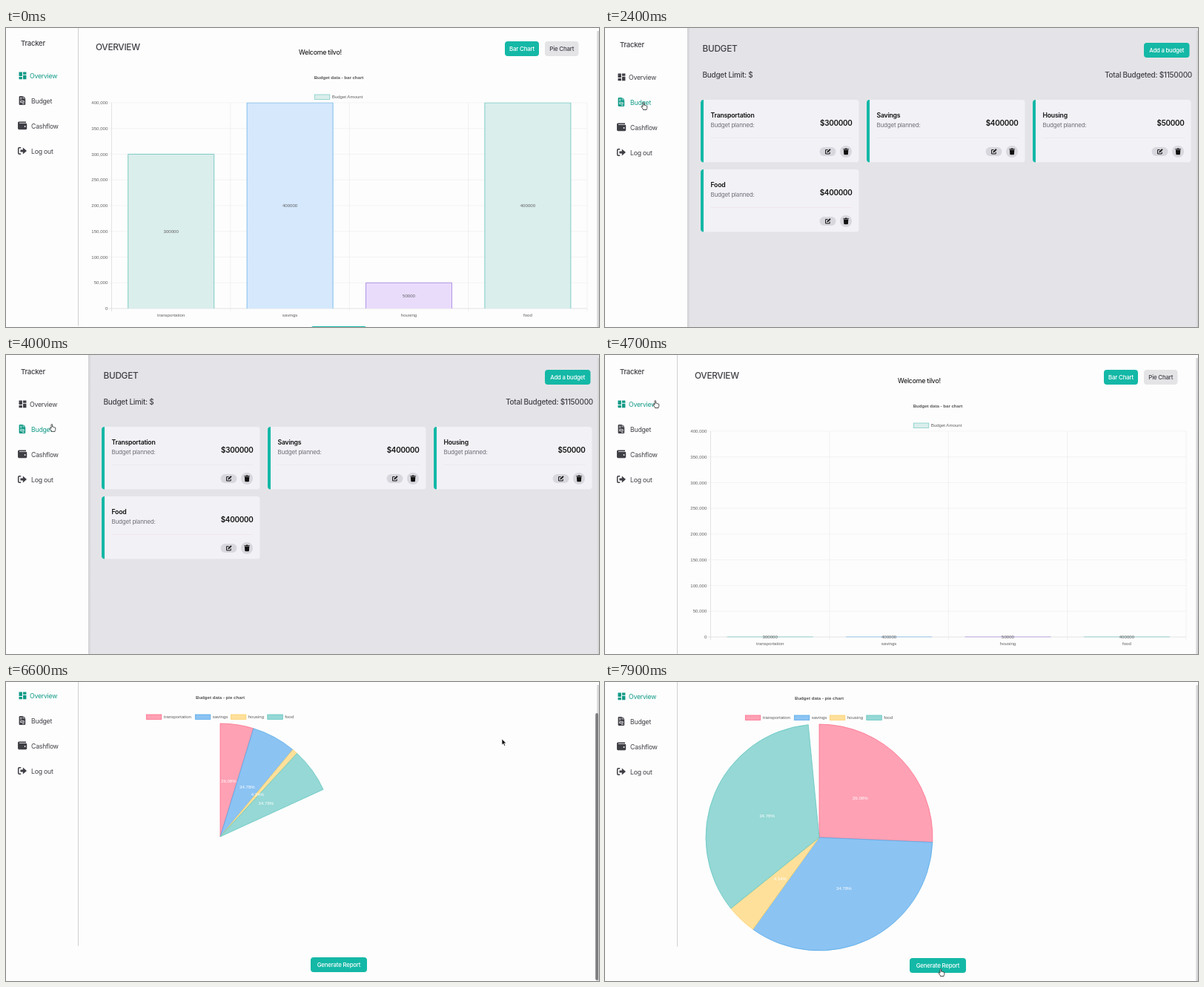
Recreate the animation shown at these times as an HTML page. Size 800 by 404 pixels, loop 8000 ms.

```html
<!DOCTYPE html>
<html lang="en">
<head>
<meta charset="utf-8">
<title>Budget tracker</title>
<style>
  html, body { margin: 0; width: 100%; height: 100%; overflow: hidden; background: #fdfdfd; }
  svg { display: block; width: 100vw; height: 100vh; }
  .ui { font-family: Inter, Roboto, sans-serif; letter-spacing: -.025em; }
  .chart { font-family: "Liberation Sans", Arial, sans-serif; }
</style>
</head>
<body>
<svg id="stage" viewBox="0 0 800 404"></svg>
<script>
const LOOP = 8000, BOUNCE = 3741;
const BARS_START = 4742, PIE_START = 6533;
const BUDGET_IN = 2200, BUDGET_OUT = 4700, PIE_IN = 6350;
const TEAL = '#14b8a6', INK = '#3f3f46', ACTIVE = '#109a86';
const BASE = 382, STEP = 34.75, LEFT = 142.5, COL = 160.4, HALF_BAR = 58;

const data = [
  { name: 'transportation', value: 300000, bar: ['#daeeec', '#74c8bf'], pie: ['#fea1b4', '#ff6384'], share: '26.08%', key: 189 },
  { name: 'savings', value: 400000, bar: ['#d5e8fc', '#78b8ea'], pie: ['#8bc3f3', '#4ba5e6'], share: '34.78%', key: 255 },
  { name: 'housing', value: 50000, bar: ['#e9dcfb', '#a98ce2'], pie: ['#fee09b', '#fbce62'], share: '4.34%', key: 303 },
  { name: 'food', value: 400000, bar: ['#daeeec', '#74c8bf'], pie: ['#95d8d5', '#58c2bd'], share: '34.78%', key: 352.5 }
];
const total = data.reduce((sum, d) => sum + d.value, 0);

// Text is placed by the vertical middle of its capitals.
const text = (x, mid, str, size, o = {}) =>
  `<text class="${o.cls || 'ui'}" x="${x}" y="${mid + size * .36}" font-size="${size}" fill="${o.fill || INK}"
    font-weight="${o.weight || 400}" text-anchor="${o.anchor || 'start'}">${str}</text>`;
const label = (x, mid, str, o = {}) => text(x, mid, str, 6.1, { cls: 'chart', fill: '#5f5f5f', ...o });
const rect = (x, y, w, h, fill, rx = 0, more = '') =>
  `<rect x="${x}" y="${y}" width="${w}" height="${h}" fill="${fill}" rx="${rx}" ${more}/>`;
const line = (x1, y1, x2, y2, color, w = .6) =>
  `<path d="M${x1} ${y1}L${x2} ${y2}" stroke="${color}" stroke-width="${w}"/>`;
const group = (id, body) => `<g id="${id}">${body}</g>`;
const button = (x, y, w, str, size, fill = TEAL, ink = '#fff') =>
  rect(x, y, w, 20, fill, 4) + text(x + w / 2, y + 10, str, size, { fill: ink, weight: 500, anchor: 'middle' });

const icons = {
  Overview: '<path d="M17.5 62.5h4.4v5.4h-4.4zM17.5 69h4.4v3.2h-4.4zM23 62.5h4.4v3.2H23zM23 66.8h4.4v5.4H23z"/>',
  Budget: `<path d="M18.8 95h4v3.3h3.4v7.5q0 1.2-1.2 1.2h-6.2q-1.2 0-1.2-1.2v-9.6q0-1.2 1.2-1.2zM23.4 95l2.8 2.8h-2.8z"/>
    <path d="M19 97.2h2.4M19 99h2.4M19.6 101.6h4.6v2h-4.6zM22 105.4h2.6" stroke="#fff" stroke-width=".8" fill="none"/>`,
  Cashflow: `<path d="M17.6 129.5h9.4v1.4H18v.8h8.8q1.4 0 1.4 1.3v5.8q0 1.4-1.4 1.4h-9.2q-1.6 0-1.6-1.6v-7.5q0-1.6 1.6-1.6z"/>
    <circle cx="25.6" cy="136" r=".9" fill="#fff"/>`,
  'Log out': `<path d="M20.2 164.8h-2.3q-1.2 0-1.2 1.2v6q0 1.2 1.2 1.2h2.3" fill="none" stroke="currentColor" stroke-width="1.5"/>
    <path d="M19.4 167.4h3.4v-2.9l5.2 4.5-5.2 4.5v-2.9h-3.4z"/>`
};

function nav() {
  return text(20, 24, 'Tracker', 9.5, { weight: 500 }) + Object.keys(icons).map((name, i) =>
    `<g class="item" data-name="${name}" fill="currentColor">${icons[name]}
      ${text(i ? 34 : 32, 68 + 34 * i, name, 8.7, { fill: 'currentColor' })}</g>`).join('');
}

const chartTitle = (x, kind) =>
  label(x, 69.5, `Budget data - ${kind} chart`, { weight: 700, anchor: 'middle', fill: '#555' });
const swatch = (x, [fill, stroke], str) =>
  rect(x + .3, 93, 20.5, 6.4, fill, 0, `stroke="${stroke}" stroke-width=".7"`) + label(x + 23.7, 96.2, str);

function barChart() {
  let out = chartTitle(449, 'bar') + swatch(416, data[0].bar, 'Budget Amount');
  for (let i = 0; i <= 8; i++) {
    const y = BASE - i * STEP;
    out += line(LEFT - 4, y, 784, y, i ? '#ececed' : '#d2d2d4');
    out += label(137.3, y, (i * 50000).toLocaleString('en-US'), { anchor: 'end' });
  }
  for (let i = 0; i <= 4; i++) {
    const x = LEFT + i * COL;
    out += line(x, 104, x, BASE + 4, i ? '#e8e8ea' : '#d2d2d4');
  }
  out += '<clipPath id="area"><rect x="142" y="103.5" width="643" height="279"/></clipPath><g clip-path="url(#area)">';
  out += data.map(d => `<path class="bar" fill="${d.bar[0]}" stroke="${d.bar[1]}" stroke-width=".9"/>`).join('') + '</g>';
  data.forEach((d, i) => {
    const x = LEFT + COL * (i + .5);
    out += `<g class="amount">${label(x, 0, d.value, { anchor: 'middle' })}</g>`;
    out += label(x, 391.3, d.name, { anchor: 'middle' });
  });
  return out + button(411, 406, 76, 'Generate Report', 7.85);
}

function pieChart() {
  return chartTitle(289, 'pie') +
    data.map(d => swatch(d.key, d.pie, d.name)).join('') +
    data.map(d => `<path class="slice" fill="${d.pie[0]}" stroke="${d.pie[1]}" stroke-width=".7"/>`).join('') +
    data.map(d => `<g class="share">${label(0, 0, d.share, { anchor: 'middle', fill: '#fff' })}</g>`).join('') +
    button(411, 421, 76, 'Generate Report', 7.85);
}

function card(d, i) {
  const x = 129 + 224 * (i % 3), y = 98 + 94 * Math.floor(i / 3);
  const name = d.name[0].toUpperCase() + d.name.slice(1);
  return `<g transform="translate(${x} ${y})">` +
    rect(0, 0, 213.5, 84.5, '#f2f1f6', 4) +
    `<path d="M4 0v84.5q-4 0-4-4V4q0-4 4-4z" fill="${TEAL}"/>` +
    text(13.5, 21, name, 8.7, { weight: 600, fill: '#111' }) +
    text(13.5, 34.5, 'Budget planned:', 8, { fill: '#6f6f78' }) +
    text(204.5, 31, '$' + d.value, 9.9, { weight: 600, fill: '#111', anchor: 'end' }) +
    line(13.5, 51.5, 204.5, 51.5, i === 3 ? '#f0dfe5' : '#e7e6ec') +
    rect(160.5, 64, 22, 12, '#d8d7dd', 6) +
    '<circle cx="196" cy="70" r="8" fill="#d8d7dd"/>' +
    `<path d="M171.6 67.6h-3v5.4h5.6v-2.4" fill="none" stroke="#111" stroke-width="1"/>
     <path d="M170.4 71.4l.3-1.6 3.6-3.6 1.3 1.3-3.6 3.6z" fill="#111"/>
     <path d="M192.4 66.2h2.2l.6-.8h1.8l.6.8h2.2v1.1h-7.4zM192.9 67.8h6.4l-.4 5.6q0 .8-.9.8h-3.8q-.9 0-.9-.8z" fill="#111"/></g>`;
}

function budgetPage() {
  return rect(111, -5, 689, 420, '#e4e4e8') + rect(111, -5, 4, 420, 'url(#shade)') +
    text(131.5, 29, 'BUDGET', 11.8, { weight: 500 }) +
    button(727, 21, 61.5, 'Add a budget', 7.7) +
    text(131.5, 64, 'Budget Limit: $', 9.95, { weight: 500 }) +
    text(792, 64, 'Total Budgeted: $1150000', 9.95, { weight: 500, anchor: 'end' }) +
    data.map(card).join('');
}

const header = text(121, 29, 'OVERVIEW', 11.8, { weight: 500 }) +
  text(395, 36, 'Welcome tilvo!', 8.8, { fill: '#000' }) +
  button(673, 21, 46, 'Bar Chart', 7.9) +
  button(727, 21, 45.5, 'Pie Chart', 7.9, '#e4e4e7', INK);

const stage = document.getElementById('stage');
stage.innerHTML = `<defs>
  <linearGradient id="shade"><stop stop-color="#cfcfd3"/><stop offset="1" stop-color="#e4e4e8"/></linearGradient>
  <linearGradient id="edge"><stop stop-color="#e6e6e8"/><stop offset="1" stop-color="#cdcdd0"/></linearGradient></defs>` +
  rect(0, 0, 800, 404, '#fdfdfd') +
  group('page',
    group('overview', line(97.5, -5, 97.5, 405.5, '#cfcfd3', 1) + header + group('bars', barChart()) + group('pie', pieChart())) +
    group('budget', budgetPage()) + nav()) +
  rect(797, 4, 3, 400, 'url(#edge)') +
  rect(795.2, 42, 3.8, 361, '#7d7d7f', 1.9, 'id="thumb"') +
  group('cursor',
    '<path id="arrow" d="M0 0v8l1.9-1.7 1.3 3 1.4-.6-1.3-2.9h2.6z" fill="#111" stroke="#fff" stroke-width=".6"/>' +
    `<path id="hand" d="M-1 .5q0-.9.8-.9t.8.9v2.7q1.2-.4 1.5.4 1.2-.4 1.5.4 1.2-.2 1.2.9v1.800q0 1.200-.7 2v.8H-.5v-.7
      L-2.800 5.700q-.5-.9.2-1.200.7-.2 1.600.8z" fill="#fff" stroke="#222" stroke-width=".8" stroke-linejoin="round"/>`);

const $ = id => document.getElementById(id);
const all = cls => [...stage.getElementsByClassName(cls)];
const parts = { bar: all('bar'), amount: all('amount'), slice: all('slice'), share: all('share'), item: all('item') };
const show = (id, on) => $(id).setAttribute('display', on ? 'inline' : 'none');
const move = (el, x, y) => el.setAttribute('transform', `translate(${x} ${y})`);

// Eased value between keys of the form [time, ...numbers].
function track(keys, t) {
  const i = keys.findIndex(k => k[0] > t);
  if (i === 0) return keys[0].slice(1);
  if (i < 0) return keys[keys.length - 1].slice(1);
  const a = keys[i - 1], b = keys[i];
  const p = (t - a[0]) / (b[0] - a[0]), e = p * p * (3 - 2 * p);
  return a.slice(1).map((v, n) => v + (b[n + 1] - v) * e);
}

function elastic(p) {
  if (p <= 0) return 0;
  if (p >= 1) return 1;
  return 1 + 2 ** (-10 * p) * Math.sin((p - .075) * 2 * Math.PI / .3);
}

const scroll = [[200, -3], [1000, 0], [1900, 0], [2200, -1], [6300, -1], [6550, -49], [7000, -49], [7500, -48]];
const pointer = [[1000, 300, 180], [1600, 96, 54], [2100, 52, 101], [2500, 52, 101], [3000, 54, 136], [3400, 54, 136],
  [4500, 68, 62], [4700, 68, 62], [5400, 758, 25], [6250, 758, 25], [6600, 669, 77], [7800, 453, 388]];
const handSpans = [[1900, 4750], [5300, 6350], [7650, LOOP]];

function drawBars(v) {
  data.forEach((d, i) => {
    const x = LEFT + COL * (i + .5), top = BASE - d.value / 50000 * STEP * v;
    parts.bar[i].setAttribute('d', `M${x - HALF_BAR} ${BASE}V${top}H${x + HALF_BAR}V${BASE}`);
    move(parts.amount[i], 0, (top + BASE) / 2);
  });
}

function drawPie(v) {
  const cx = 289, cy = 258, r = 153;
  const at = (a, radius) => [cx + radius * Math.sin(a), cy - radius * Math.cos(a)];
  let from = 0;
  data.forEach((d, i) => {
    const sweep = 2 * Math.PI * v * d.value / total;
    parts.slice[i].setAttribute('d',
      `M${cx} ${cy}L${at(from, r)}A${r} ${r} 0 ${sweep > Math.PI ? 1 : 0} 1 ${at(from + sweep, r)}Z`);
    move(parts.share[i], ...at(from + sweep / 2, r / 2));
    from += sweep;
  });
}

function draw(t) {
  const onBudget = t >= BUDGET_IN && t < BUDGET_OUT, onPie = t >= PIE_IN;
  show('budget', onBudget);
  show('overview', !onBudget);
  show('bars', !onPie);
  show('pie', onPie);
  move($('page'), 0, track(scroll, t)[0]);
  parts.item.forEach(el => {
    const active = el.dataset.name === (onBudget ? 'Budget' : 'Overview');
    el.setAttribute('color', active ? ACTIVE : INK);
  });
  drawBars(t < BUDGET_IN ? 1 : elastic((t - BARS_START) / BOUNCE));
  drawPie(elastic((t - PIE_START) / BOUNCE));

  const hand = handSpans.some(([a, b]) => t >= a && t < b);
  show('cursor', t >= 1000);
  show('hand', hand);
  show('arrow', !hand);
  move($('cursor'), ...track(pointer, t));
  $('thumb').setAttribute('opacity', t < PIE_IN ? 0 : Math.max(0, Math.min(1, (7300 - t) / 300)));
}

const start = performance.now();
function tick() {
  draw((performance.now() - start) % LOOP);
  requestAnimationFrame(tick);
}
tick();
</script>
</body>
</html>
```
